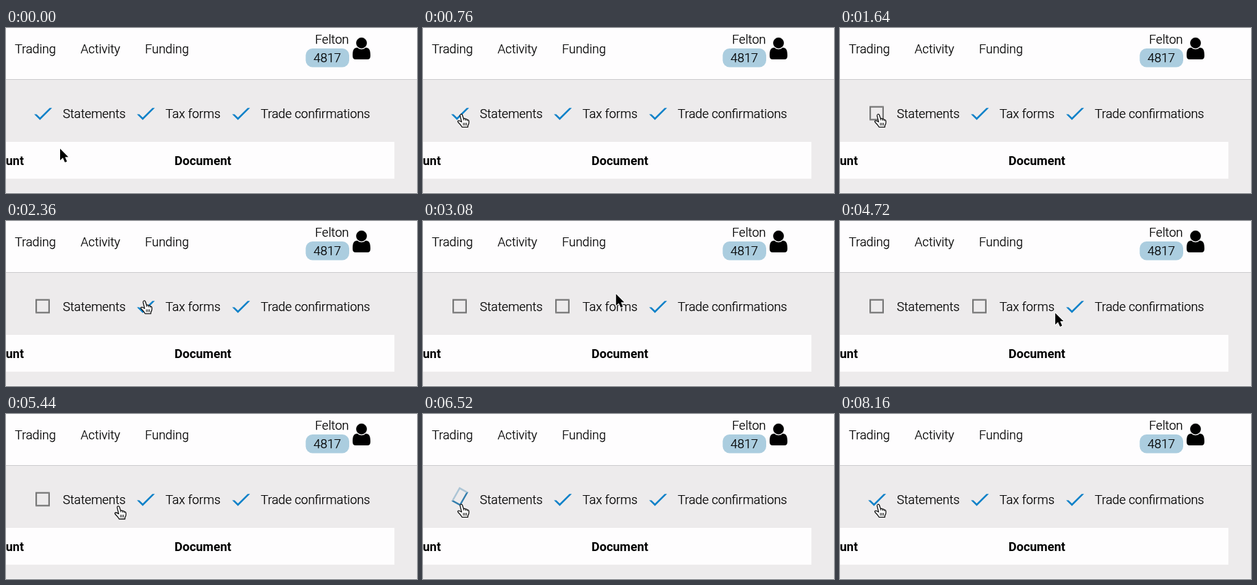
These frames come from a looping animation (600x242 px, 8.2 s). An HTML page with a canvas:

```html
<!DOCTYPE html>
<html lang="en">
<head>
<meta charset="utf-8">
<title>Document filters</title>
<style>
  html, body { margin: 0; width: 100%; height: 100%; overflow: hidden; }
  canvas { display: block; }
</style>
</head>
<body>
<canvas id="stage" width="600" height="242"></canvas>
<script>
const ctx = document.getElementById('stage').getContext('2d');
const LOOP = 8200;
const TOGGLE = 200;

// x: offset from the first box, flips: times at which the state changes
const filters = [
  { x: 0, label: 'Statements', textX: 83, right: 175, flips: [980, 6400] },
  { x: 150, label: 'Tax forms', textX: 233, right: 314, flips: [2580, 5160] },
  { x: 289, label: 'Trade confirmations', textX: 372, right: 532, flips: [3620, 4400] },
];

// Pointer moves: start, end, target x, target y, upward bow
const origin = [79, 177];
const moves = [
  [40, 740, 56, 127, 0],
  [1740, 2340, 202, 117.5, 0],
  [2620, 3480, 346, 113, 8],
  [3700, 4060, 354, 134.5, 0],
  [4540, 5080, 202, 136, 0],
  [5140, 5960, 78, 135, 0],
  [6060, 6320, 56, 133, 0],
];

const clamp = v => Math.max(0, Math.min(1, v));
const mix = (a, b, k) => a + (b - a) * k;
const ease = v => { const u = clamp(v); return u * u * (3 - 2 * u); };

function boldText(str, x, y, align = 'left') {
  ctx.font = '700 18px Roboto, sans-serif';
  ctx.textAlign = align;
  ctx.fillStyle = '#000';
  ctx.fillText(str, x, y);
}

// Light text with a hairline outline, as smoothed type looks slightly heavier.
function lightText(str, x, y, align = 'left') {
  ctx.font = '300 18.1px Roboto, sans-serif';
  ctx.textAlign = align;
  ctx.fillStyle = ctx.strokeStyle = '#000';
  ctx.lineWidth = 0.25;
  ctx.fillText(str, x, y);
  ctx.strokeText(str, x, y);
}

function rect(color, x, y, w, h) {
  ctx.fillStyle = color;
  ctx.fillRect(x, y, w, h);
}

function polygon(color, points) {
  ctx.beginPath();
  points.forEach(([x, y]) => ctx.lineTo(x, y));
  ctx.fillStyle = color;
  ctx.fill();
}

const shoulders = new Path2D('M0 26.5 C0 18 2 14.7 6.8 14.7 Q13 20 19.2 14.7' +
  ' C24 14.7 26 18 26 26.5 Q26 32 21.7 32 H4.3 Q0 32 0 26.5Z');

function drawPerson(x, y) {
  ctx.save();
  ctx.translate(x, y);
  ctx.fillStyle = '#000';
  ctx.beginPath();
  ctx.arc(13, 8, 7.9, 0, Math.PI * 2);
  ctx.fill();
  ctx.fill(shoulders);
  ctx.restore();
}

function drawPage() {
  rect('#edebec', 0, 0, 600, 242);
  rect('#fefdfe', 0, 0, 600, 75);
  rect('#cbcacc', 0, 75, 600, 1);
  rect('#fefdfe', 0, 167, 567, 54);
  rect('#f8f7f8', 0, 241, 600, 1);

  lightText('Trading', 13, 37);
  lightText('Activity', 109, 37);
  lightText('Funding', 203, 37);
  lightText('Felton', 500.5, 23, 'right');
  ctx.fillStyle = '#abcddf';
  ctx.beginPath();
  ctx.roundRect(437.5, 30, 63.5, 27.5, 10);
  ctx.fill();
  lightText('4817', 469, 50, 'center');
  drawPerson(506, 14);

  boldText('Account', 26, 201, 'right');
  boldText('Document', 246, 201);
}

function checkedAmount([off, on], t) {
  return 1 - ease((t - off) / TOGGLE) + ease((t - on) / TOGGLE);
}

// The box narrows and turns about its lower right corner to become a tick;
// its borders meet in mitred corners, which give the tick its slanted ends.
function drawCheckbox(x, k) {
  const w = mix(21, 12, k);
  const h = mix(21, 25, k);
  const b = mix(2.2, 2.5, k);
  const shade = [mix(118, 14, k), mix(118, 129, k), mix(118, 200, k)].map(Math.round);
  const ends = [[-w, 0], [-w + b, -b]];
  const tops = [[-b, -h + b], [0, -h]];
  ctx.save();
  ctx.translate(x + mix(64, 49.6, k), mix(135.5, 134.9, k));
  ctx.rotate(mix(0, Math.PI / 4, k));
  polygon(`rgba(${shade},${1 - k})`, [...ends, [-w + b, -h + b], ...tops, [-w, -h]]);
  polygon(`rgb(${shade})`, [...ends, [-b, -b], ...tops, [0, 0]]);
  ctx.restore();
}

function pointerAt(t) {
  let [x, y] = origin;
  for (const [start, end, tx, ty, bow] of moves) {
    if (t < start) break;
    const k = ease((t - start) / (end - start));
    x = mix(x, tx, k);
    y = mix(y, ty, k) - bow * Math.sin(Math.PI * k);
  }
  return [x, y];
}

const arrow = new Path2D('M0 0 V17 L4 13.3 L7 20 L10 18.7 L7.2 12.2 H12Z');
const hand = new Path2D(
  'M-1.8 2 Q-2.2 0 -.6 -.5 Q1 -.8 1.6 1 L3.2 6 Q5 5 6 6.6 Q8 6 8.6 7.7' +
  ' Q10.7 7.4 11 9.8 V12 Q11 14 9.5 16 V18.3 H1 Q-.5 15.5 -3 13' +
  ' Q-5.8 10.5 -5 9.3 Q-3.7 8.2 -1.5 9.7 L.4 10.8Z');
const folds = new Path2D('M3 12 V16 M5.2 12 V16 M7.4 12 V16 M3.2 6 L3.8 8.5 M6 6.6 L6.5 9 M8.6 7.7 L8.9 9.5');

function drawPointer(x, y) {
  const over = y > 110 && y < 147 &&
    filters.some(f => x >= f.x + 41 && x <= f.right);
  ctx.save();
  ctx.translate(x, y);
  ctx.lineJoin = 'round';
  if (over) {
    ctx.fillStyle = '#fff';
    ctx.fill(hand);
    ctx.strokeStyle = '#111';
    ctx.lineWidth = 1.3;
    ctx.stroke(hand);
    ctx.lineWidth = 1;
    ctx.stroke(folds);
  } else {
    ctx.strokeStyle = '#fff';
    ctx.lineWidth = 2;
    ctx.stroke(arrow);
    ctx.fillStyle = '#000';
    ctx.fill(arrow);
  }
  ctx.restore();
}

function draw() {
  const t = performance.now() % LOOP;
  drawPage();
  for (const f of filters) {
    drawCheckbox(f.x, checkedAmount(f.flips, t));
    lightText(f.label, f.textX, 132);
  }
  drawPointer(...pointerAt(t));
  requestAnimationFrame(draw);
}
draw();
</script>
</body>
</html>
```
